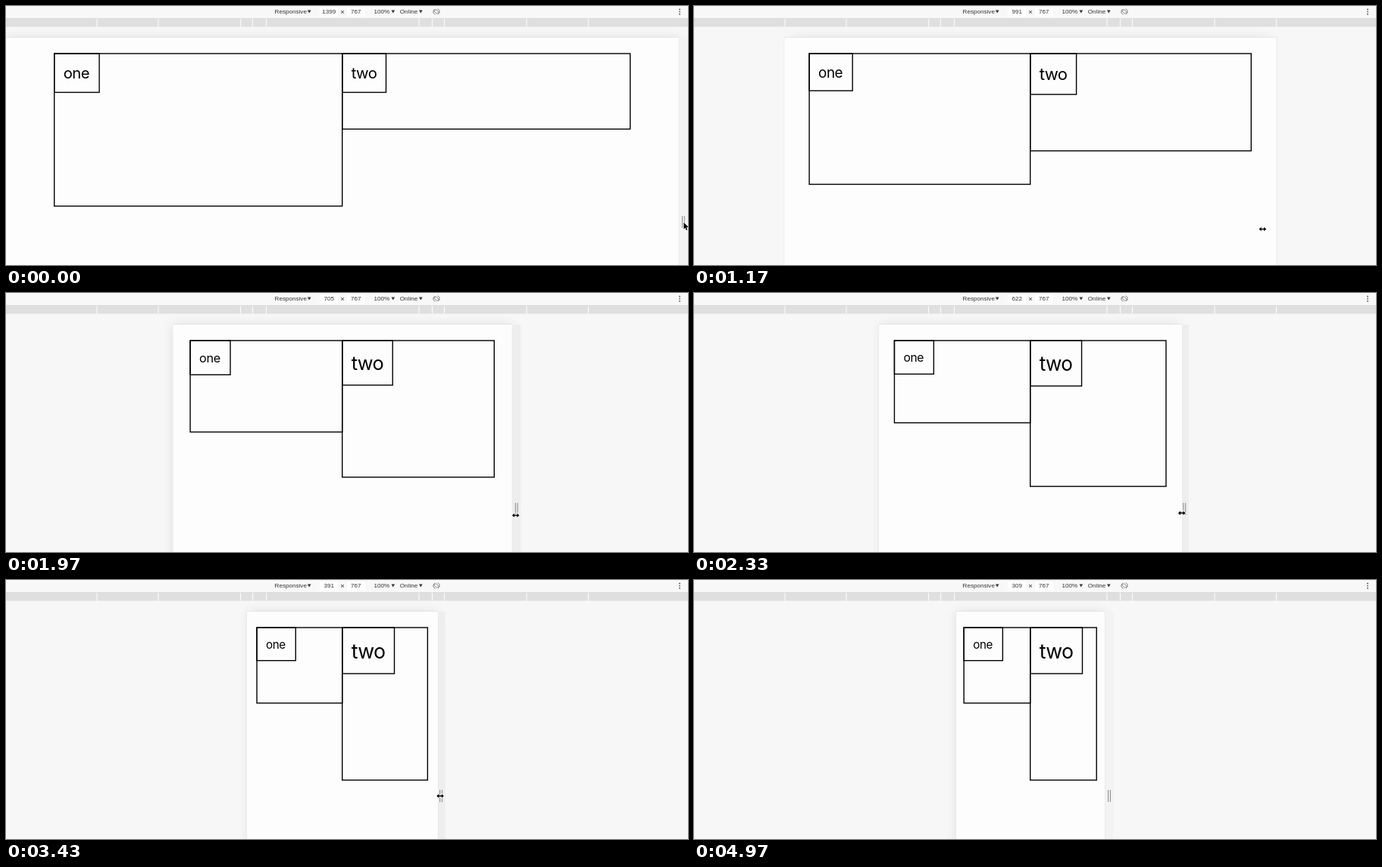
Recreate the animation shown at these times as an HTML page with a canvas. Size 900x343 px, loop 5430 ms.

```html
<!DOCTYPE html>
<html lang="en">
<head>
<meta charset="utf-8">
<title>Fluid boxes</title>
<style>
  html, body { margin: 0; width: 100%; height: 100%; overflow: hidden; background: #f7f7f7; }
  canvas { display: block; width: 900px; height: 343px; }
</style>
</head>
<body>
<canvas id="stage" width="900" height="343"></canvas>
<script>
const ctx = document.getElementById('stage').getContext('2d');
const LOOP = 5430, STEP = 100 / 3, SCALE = 0.6345, CENTER = 444, TOP = 42;

// [time in ms, value]
const WIDTHS = [[640, 1399], [900, 1250], [1133, 1024], [1167, 991], [1200, 950], [1400, 858],
  [1767, 766], [1933, 705], [2000, 705], [2333, 622], [2700, 533], [2766, 533], [2900, 519],
  [3400, 397], [3430, 391], [3480, 391], [4020, 309]];
const CURSOR_Y = [[200, 290], [670, 290], [1167, 295.5], [1967, 294.5], [2733, 288], [3433, 286]];

const mix = (a, b, p) => a + (b - a) * p;
const clamp01 = v => Math.min(1, Math.max(0, v));

function sample(keys, t) {
  const i = keys.findIndex(key => key[0] > t);
  if (i === 0) return keys[0][1];
  if (i < 0) return keys[keys.length - 1][1];
  const [t0, a] = keys[i - 1], [t1, b] = keys[i];
  return mix(a, b, (t - t0) / (t1 - t0));
}

const viewport = t => sample(WIDTHS, t);
const rightEdge = width => CENTER + width * SCALE / 2;

function rect(x, y, w, h, color) {
  ctx.fillStyle = color;
  ctx.fillRect(x, y, w, h);
}

function polygon(points, x, y) {
  ctx.beginPath();
  points.forEach(([px, py]) => ctx.lineTo(x + px, y + py));
  ctx.closePath();
}

function text(value, x, y, font, color, align = 'left', spacing = '0px') {
  ctx.font = font;
  ctx.fillStyle = color;
  ctx.textAlign = align;
  ctx.letterSpacing = spacing;
  ctx.fillText(value, x, y);
}

function drawToolbar(width) {
  const font = '8.1px "Liberation Sans", Arial, sans-serif', ink = '#333';
  rect(0, 0, 900, 16, '#f8f8f9');
  rect(0, 16, 900, 1, '#dcdcdc');
  rect(0, 17, 900, 10.5, '#dfdfdf');
  for (const x of [120, 201, 309.5, 325.5, 343.5, 545, 562.5, 578.5, 687, 768.5]) {
    rect(x - 0.6, 17, 1.2, 10.5, '#fafafa');
  }
  rect(414, 2, 24, 12, '#fff');
  rect(450, 2, 24, 12, '#fff');
  text('Responsive', 354.6, 10.4, font, ink);
  text(Math.round(width), 426.3, 10.4, font, ink, 'center');
  text('×', 444, 11.2, '9.5px "Liberation Sans", Arial, sans-serif', ink, 'center');
  text('767', 461.8, 10.4, font, ink, 'center');
  text('100%', 485.6, 10.4, font, ink);
  text('Online', 519.8, 10.4, font, ink);
  for (const x of [400.2, 510.8, 547.3]) {
    polygon([[-2.3, 0], [2.3, 0], [0, 4.2]], x, 5.4);
    ctx.fill();
  }

  // Rotate icon
  ctx.save();
  ctx.translate(568, 7.5);
  ctx.rotate(-Math.PI / 4);
  ctx.strokeStyle = '#666';
  ctx.lineWidth = 0.8;
  ctx.strokeRect(-1.6, -2.7, 3.2, 5.4);
  for (const start of [-0.4, 2.74]) {
    ctx.beginPath();
    ctx.arc(0, 0, 4, start, start + 2.2);
    ctx.stroke();
  }
  ctx.restore();

  ctx.fillStyle = '#555';
  for (const y of [4.5, 7.6, 10.7]) {
    ctx.beginPath();
    ctx.arc(889, y, 0.95, 0, 7);
    ctx.fill();
  }
}

function drawDevice(width, hover) {
  const right = rightEdge(width), left = 2 * CENTER - right;
  const shade = Math.round(mix(243, 238, hover));
  ctx.save();
  ctx.beginPath();
  ctx.rect(0, 27.5, 900, 316);
  ctx.clip();
  ctx.shadowColor = 'rgba(0,0,0,.1)';
  ctx.shadowBlur = 14;
  rect(left, TOP, right - left, 400, '#fdfdfd');
  ctx.restore();
  rect(right, TOP, 11.5, 301, `rgb(${shade},${shade},${shade})`);
  for (const x of [-1.4, 1.4]) rect(right + 6 + x - 0.5, 278, 1, 16, '#888');
}

function drawPage(width) {
  const half = width * SCALE / 2;
  rect(CENTER - half - 0.5, TOP - 0.7, half * 2 + 1, 310, '#e5e5e5');
  rect(CENTER - half, TOP, half * 2, 310, '#fdfdfd');

  const middle = 443.7, boxWidth = Math.min(600, width * 0.45) * SCALE - 0.7;
  const p = clamp01((width - 576) / 624);
  drawBox('one', middle - boxWidth, boxWidth, mix(100, 202, p),
    mix(51.2, 59.4, p), mix(43.7, 51.4, p), mix(15.2, 20.3, p));
  drawBox('two', middle, boxWidth, mix(202, 100, p),
    mix(68.8, 57.8, p), mix(61, 51.4, p), mix(26.8, 20.3, p));
}

function drawBox(label, x, width, height, tagWidth, tagHeight, size) {
  const y = 63;
  ctx.strokeStyle = '#000';
  ctx.lineWidth = 1.4;
  ctx.strokeRect(x, y, width, height);
  ctx.strokeRect(x, y, tagWidth, tagHeight);
  text(label, x + 12, y + tagHeight / 2 + size * 0.38,
    `${size}px Inter, sans-serif`, '#000', 'left', `${-0.025 * size}px`);
}

function drawCursor(points, x, y) {
  polygon(points, x, y);
  ctx.strokeStyle = '#fff';
  ctx.lineWidth = 1.4;
  ctx.stroke();
  ctx.fillStyle = '#000';
  ctx.fill();
}

const ARROW = [[0, 0], [0, 9], [2, 7.2], [3.4, 10.4], [4.9, 9.7], [3.5, 6.7], [6.2, 6.5]];
const RESIZE = [[-4.8, 0], [-1.8, -2.8], [-1.8, -0.8], [1.8, -0.8], [1.8, -2.8],
  [4.8, 0], [1.8, 2.8], [1.8, 0.8], [-1.8, 0.8], [-1.8, 2.8]];

function drawPointer(t) {
  if (t < 30) return drawCursor(ARROW, 894.4, 286.5);
  if (t >= 4725) {
    const p = clamp01((t - 4700) / 260);
    if (p < 1) drawCursor(ARROW, mix(549, 657, p), mix(284, -12, p * p));
    return;
  }
  const shift = mix(5, 8.5, clamp01((t - 4090) / 70));
  drawCursor(RESIZE, rightEdge(viewport(t + STEP)) + shift, sample(CURSOR_Y, t));
}

function draw(time) {
  const t = Math.floor((time % LOOP + 4) / STEP) * STEP;
  const width = viewport(t);
  const hover = t < 4560 ? clamp01(t / 190) : 0.5 * (1 - clamp01((t - 4720) / 240));
  rect(0, 0, 900, 343, '#f7f7f7');
  drawDevice(width, hover);
  drawPage(viewport(t - STEP)); // content repaints one step behind its frame
  drawToolbar(width);
  drawPointer(t);
}

const start = performance.now();
function tick() {
  draw(performance.now() - start);
  requestAnimationFrame(tick);
}
tick();
</script>
</body>
</html>
```
